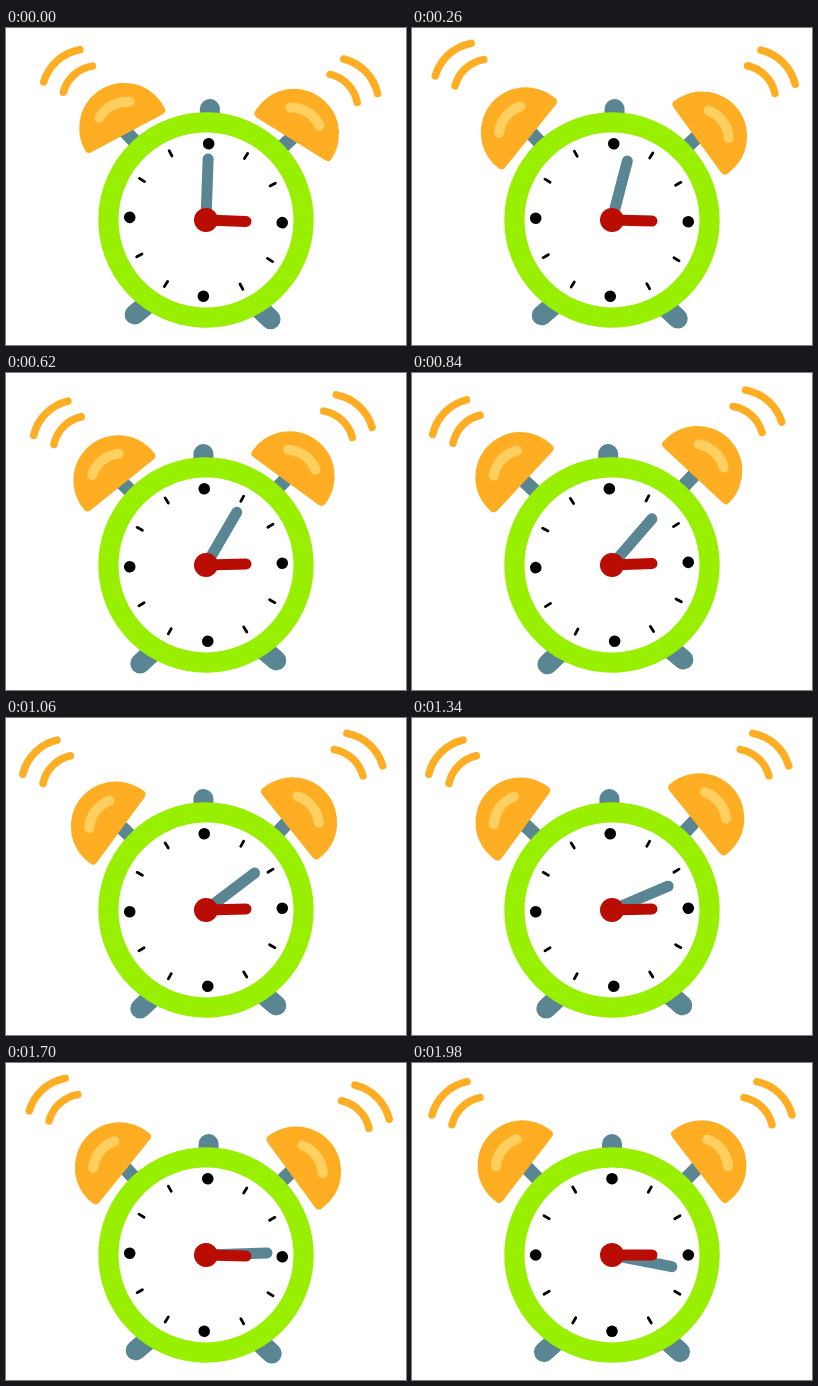
An HTML page for the animation above (2 s loop, 400 by 317 pixels).

```html
<!DOCTYPE html>
<html lang="en">
<head>
<meta charset="utf-8">
<title>Ringing alarm clock</title>
<style>
  html, body { margin: 0; width: 100%; height: 100%; overflow: hidden; background: #fff; }
  svg { display: block; width: 400px; height: 317px; }
  .line { fill: none; stroke-linecap: round; }
  .steel { stroke: #5a8592; }
  .orange { stroke: #ffad23; }
  .red { stroke: #b90c03; }
</style>
</head>
<body>
<svg viewBox="0 0 400 317">
  <g id="clock">
    <path class="line steel" stroke-width="20" d="M200 81V95"/>
    <g id="side">
      <path class="line steel" stroke-width="20" d="M132 289L152 271"/>
      <path class="steel" stroke-width="14" d="M110 100L138 128"/>
      <g id="bell">
        <path fill="#ffad23" d="M-40 0Q-46 0 -45 -6A45 45 0 0 1 45 -6Q46 0 40 0Z"/>
        <path class="line" stroke="#ffd05f" stroke-width="10" d="M-17 -26.5A31.5 31.5 0 0 1 17 -26.5"/>
      </g>
      <g id="waves" class="line orange" stroke-width="7.5">
        <path d="M20 52A46 46 0 0 1 55 18.7"/>
        <path d="M40 61.6A36 36 0 0 1 68 34.6"/>
      </g>
    </g>
    <use href="#side" transform="translate(400) scale(-1 1)"/>
    <g transform="translate(200 192)">
      <circle r="97.6" fill="#fff" stroke="#98ef00" stroke-width="20.2"/>
      <g id="marks"></g>
      <path id="minute" class="line steel" stroke-width="11" d="M0 0V-61"/>
      <path class="line red" stroke-width="11" d="M0 0H40"/>
      <circle r="12" fill="#b90c03"/>
    </g>
  </g>
</svg>
<script>
  const LOOP = 2000, STEP = 20;
  const ROCK = 240, RING = 160;
  const $ = id => document.getElementById(id);
  const move = (id, value) => $(id).setAttribute('transform', value);

  // 0 at the start of a period, 1 halfway, 0 again at the end
  const triangle = (t, period) => 1 - Math.abs(1 - 2 * (t % period) / period);

  $('marks').innerHTML = Array.from({ length: 12 }, (_, i) => {
    const turn = `transform="rotate(${i * 30})"`;
    return i % 3
      ? `<path class="line" stroke="#000" stroke-width="2.8" d="M0 -72.5V-78.5" ${turn}/>`
      : `<circle cy="-76.3" r="5.8" ${turn}/>`;
  }).join('');

  function draw(t) {
    const swing = triangle(t, ROCK);
    const tilt = triangle(t, RING);
    const phase = 2 * Math.PI * t / RING;
    const bob = -2.83 * Math.sin(phase);
    const spread = 0.854 - (1 - Math.cos(phase)) / 2;

    move('clock', `rotate(${2 - 4 * swing} 200 192)`);
    move('bell', `translate(${118 - 2.8 * tilt + 0.33 * bob} ${108 + bob}) rotate(${-30 - 30 * tilt})`);
    move('waves', `translate(${15.2 * spread} ${8.9 * spread})`);
    move('minute', `rotate(${t * 0.051})`);
  }

  function tick(now) {
    draw(Math.floor((now % LOOP + 0.5) / STEP) * STEP % LOOP);
    requestAnimationFrame(tick);
  }

  draw(0);
  requestAnimationFrame(tick);
</script>
</body>
</html>
```
